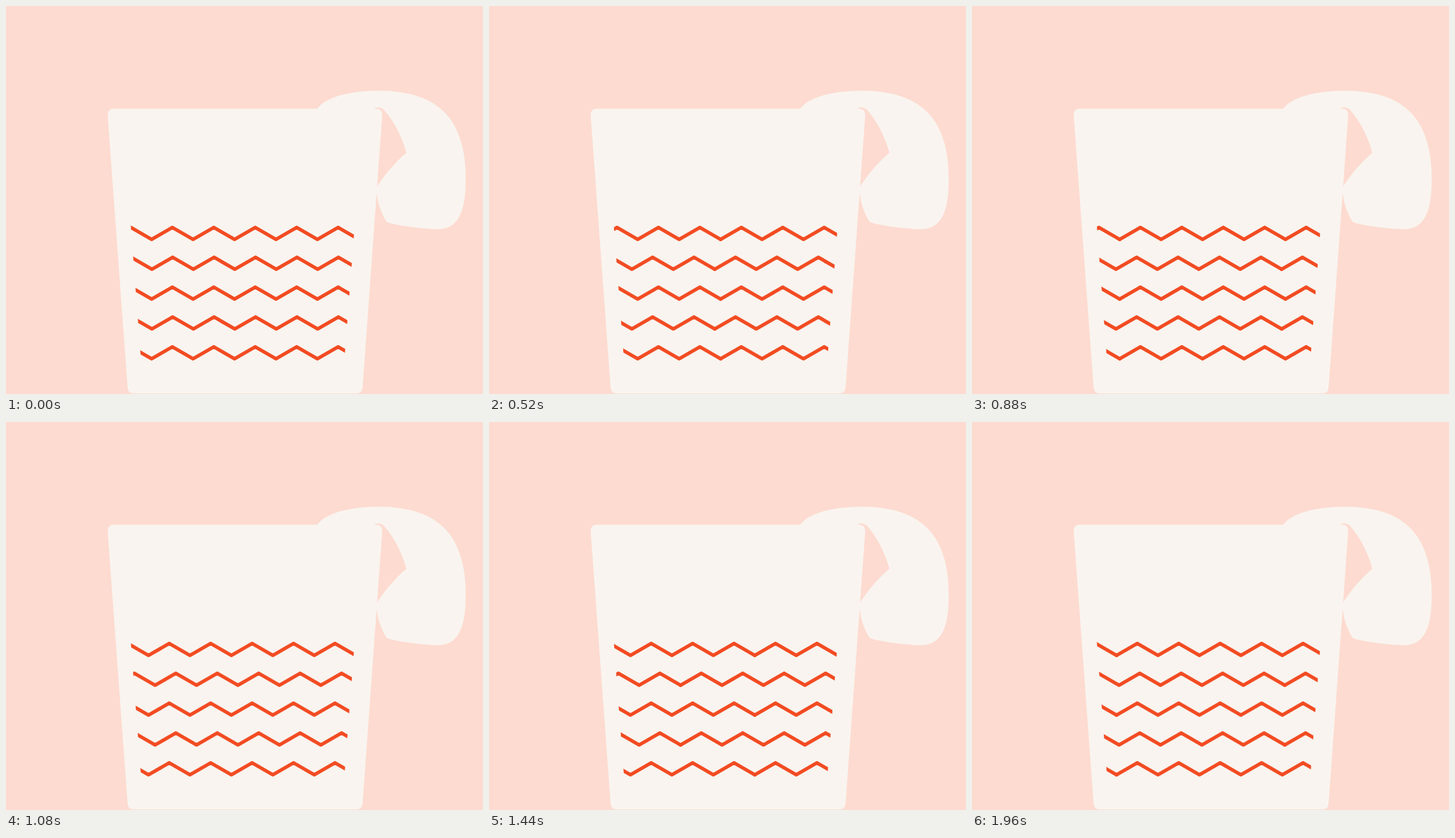
An HTML page without scripts for the animation above (2000 ms loop, 800x650 px).

```html
<!DOCTYPE html>
<html lang="en">
<head>
<meta charset="utf-8">
<title>Mug with zigzag waves</title>
<style>
  html, body { margin: 0; width: 100%; height: 100%; overflow: hidden; background: #fddbd0; }
  svg { display: block; width: 800px; height: 650px; }
  .cup { fill: #f9f4ef; }
  .hole { fill: #fddbd0; }
  .waves { fill: none; stroke: #f24b22; stroke-width: 6; stroke-linejoin: round; stroke-linecap: round; }
  /* 25 drawings per second, 11.25 wavelengths per loop */
  .left, .right { animation: drift 2s steps(50) -4ms infinite; }
  .left { --far: -782px; }
  .right { --far: 782px; }
  @keyframes drift {
    from { transform: translateX(0); }
    to { transform: translateX(var(--far)); }
  }
</style>
</head>
<body>
<svg viewBox="0 0 800 650">
  <defs>
    <path id="zig" d="M0 20l34.75-20 34.75 20 34.75-20 34.75 20 34.75-20 34.75 20 34.75-20 34.75 20 34.75-20 34.75 20 34.75-20 34.75 20"/>
    <g id="row">
      <use href="#zig"/>
      <use href="#zig" x="417"/>
      <use href="#zig" x="834"/>
    </g>
    <clipPath id="band">
      <path d="M208.7 360H585.4L567 600H226.9Z"/>
    </clipPath>
  </defs>

  <path class="cup" d="M522 172C540 148 590 142 625 142C732 142 771 196 771 290C771 352 755 374 722 374C698 373 664 369 645 364Q640 363 638 361C631 350 624 334 622 315L600 303V172Z"/>
  <path class="hole" d="M617 172C622 169 629 169 634 174C650 192 664 218 671.5 246C652 262 634 284 622 303H612Z"/>
  <path class="cup" d="M181 172H620Q631 172 631 183L598 640Q597 649 588 649H214Q205 649 204 640L170.500 183Q170.500 172 181 172Z"/>

  <g class="waves" clip-path="url(#band)">
    <g class="left">
      <use href="#row" x="174.75" y="371"/>
      <use href="#row" x="174.75" y="471"/>
      <use href="#row" x="174.75" y="571"/>
    </g>
    <g class="right">
      <use href="#row" x="-658.75" y="421"/>
      <use href="#row" x="-658.75" y="521"/>
    </g>
  </g>
</svg>
</body>
</html>
```
